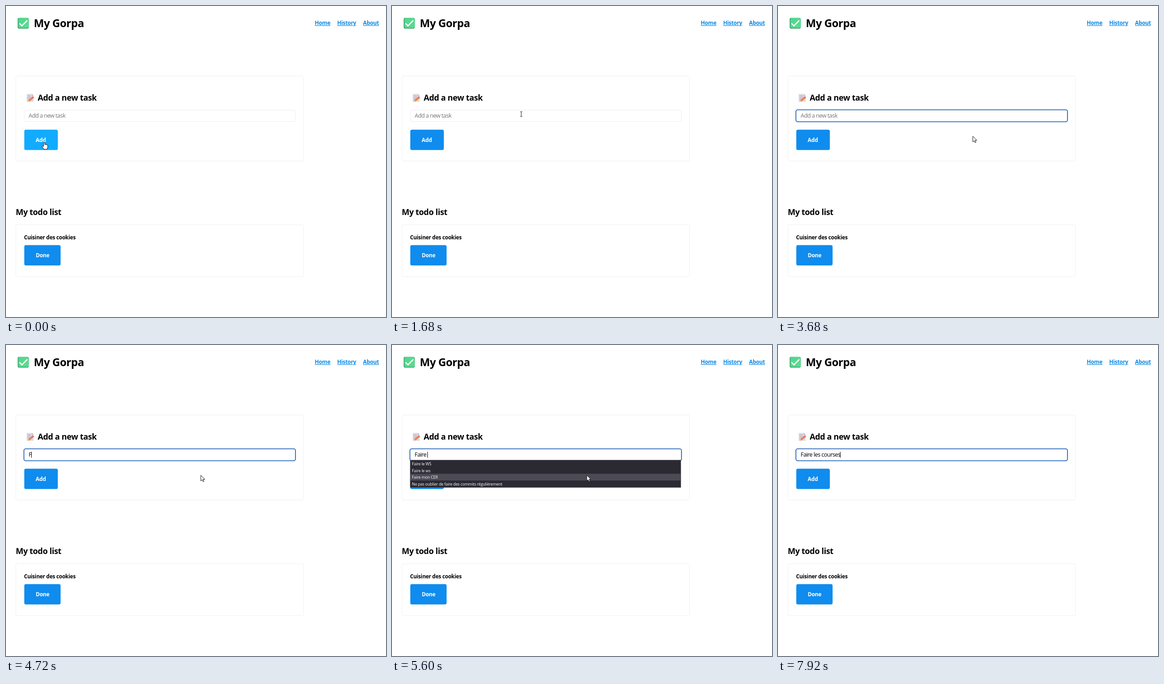
An HTML page that plays this animation: 827x677 px, repeating every 8 s.

```html
<!DOCTYPE html>
<html lang="en">
<head>
<meta charset="utf-8">
<title>Task list</title>
<style>
  html, body { margin: 0; width: 100%; height: 100%; overflow: hidden; background: #fff; }
  svg { display: block; width: 100%; height: 100%; }
  text { font-family: "Open Sans", "Noto Sans", sans-serif; white-space: pre; }
  .bold { font-weight: 700; letter-spacing: -.02em; }
  .title { font-size: 23.5px; }
  .heading { font-size: 17.6px; }
  .nav { font-size: 11.8px; fill: #0c89e4; text-decoration: underline; }
  .label { font-size: 11.8px; fill: #fff; }
  .field { font-size: 12.6px; letter-spacing: -.05em; }
  .option { font-size: 8.7px; letter-spacing: -.02em; fill: #fbfbfe; }
  .card { fill: #fff; stroke: #f0f0f0; }
  .button { fill: #0f8cee; }
  .cursor { fill: #fff; stroke: #111; stroke-width: 1; stroke-linejoin: round; }
</style>
</head>
<body>
<svg viewBox="0 0 827 677">
  <defs>
    <linearGradient id="green" x2="1" y2="1">
      <stop stop-color="#50d68b"/><stop offset="1" stop-color="#5bdc94"/>
    </linearGradient>
  </defs>

  <rect x="25.5" y="25.8" width="24" height="23.5" rx="3" fill="#3a9c68"/>
  <rect x="27" y="26" width="22.3" height="21.8" rx="2.5" fill="url(#green)"/>
  <path d="M29.5 37.8l5.2 5.4L46.3 31.5" fill="none" stroke="#fff" stroke-width="2.5"/>
  <text class="bold title" x="60.5" y="46">My Gorpa</text>
  <text class="bold nav" x="672" y="41">Home</text>
  <text class="bold nav" x="720.7" y="41">History</text>
  <text class="bold nav" x="777" y="41">About</text>

  <rect class="card" x="21.5" y="152.5" width="626" height="185" rx="3.5"/>
  <path d="M45 191.5h11.5l3.5 3.5v13.5H45z" fill="#dcd9e6"/>
  <path d="M56.5 191.5v3.5H60z" fill="#b5b1c4"/>
  <path d="M47 195.5h7M47 198.5h8M47 201.5h6M47 204.5h3" stroke="#aaa7ba"/>
  <path d="M58.5 199.2L50 206.2" stroke="#f3813f" stroke-width="4.2"/>
  <path d="M59.8 198.2l-1.6 1.3" stroke="#e85f78" stroke-width="4.2"/>
  <path d="M48.7 204.6l2.7 3.2-4 .9z" fill="#e9b98a"/>
  <text class="bold heading" x="69" y="206.4">Add a new task</text>

  <rect x="40" y="226.5" width="589.5" height="25" rx="3" fill="#fff" stroke="#ededf0"/>
  <rect id="focus" x="39" y="226" width="591" height="26" rx="4" fill="#fff" stroke="#0f55b0" stroke-width="1.6"/>
  <text id="entry" class="field" x="49.3" y="243.3"></text>
  <path id="caret" d="M0 232.5v13" stroke="#000"/>
  <rect id="add" class="button" x="39.8" y="269.2" width="73" height="44.2" rx="3.5"/>
  <text class="bold label" x="64.6" y="296">Add</text>

  <text class="bold heading" x="21.2" y="455.4">My todo list</text>
  <rect class="card" x="21.5" y="476" width="626" height="113" rx="3.5"/>
  <text class="bold" font-size="11.55" x="39.3" y="508.3">Cuisiner des cookies</text>
  <rect class="button" x="39.8" y="520.6" width="79" height="44.2" rx="3.5"/>
  <text class="bold label" x="64.7" y="547.4">Done</text>

  <g id="menu">
    <rect id="panel" x="39.7" y="250.5" width="589" fill="#2b2a33" stroke="#55545f" stroke-width=".7"/>
    <rect id="hover" x="40" y="280.2" width="588.4" height="14.8" fill="#4b4a55"/>
  </g>

  <g id="pointer" class="cursor">
    <path id="arrow" d="M0 0v12.5l2.9-2.7 2 4.2 2-1-2-4h3.9z"/>
    <path id="hand" d="M-1.2 1Q0-1.2 1.3 1V5.5L3 5l1 1 1.8-.3 1 1.2 1.1.2V11.5L6 16H-.2L-4.5 9.8Q-4.4 8-2.8 8.4L-1.2 10z"/>
    <path id="beam" d="M-2.2-5.5Q0-5.5 0-4.5Q0-5.5 2.2-5.5M0-4.5V4.5M-2.2 5.5Q0 5.5 0 4.5Q0 5.5 2.2 5.5" fill="none"/>
  </g>
</svg>
<script>
  const LOOP = 8000, STEP = 80;
  const FOCUS_AT = 1840, MENU_OPEN = 4880, MENU_SHORT = 5680, MENU_CLOSE = 5920;
  const PHRASE = "Faire les courses";
  const KEY_TIMES = [4640, 4880, 5040, 5200, 5360, 5520, 5680, 5760, 5920, 6000,
                     6240, 6320, 6480, 6560, 6720, 6800, 6880];
  const PATH = [[0, 83, 296], [520, 83, 296], [1040, 119.5, 194.5],
                [FOCUS_AT, 300, 240], [2240, 424, 283.5]];
  const OPTIONS = ["Faire le WS", "Faire le ws", "Faire mon CER",
                   "Ne pas oublier de faire des commits régulièrement"];
  const ROW = 14.8;

  const $ = id => document.getElementById(id);
  const show = (el, on) => el.style.display = on ? "" : "none";
  const inside = (x, y, l, t, r, b) => x >= l && x <= r && y >= t && y <= b;

  const rows = OPTIONS.map((label, i) => {
    const row = document.createElementNS("http://www.w3.org/2000/svg", "text");
    row.setAttribute("class", "option");
    row.setAttribute("x", 43.3);
    row.setAttribute("y", 261.8 + i * ROW);
    row.textContent = label;
    return $("menu").appendChild(row);
  });

  function pointerAt(t) {
    const next = PATH.findIndex(p => p[0] > t);
    if (next < 0) return PATH[PATH.length - 1].slice(1);
    const [t0, x0, y0] = PATH[next - 1], [t1, x1, y1] = PATH[next];
    const u = (t - t0) / (t1 - t0), k = u * u * (3 - 2 * u);
    return [x0 + (x1 - x0) * k, y0 + (y1 - y0) * k];
  }

  function drawPointer(t) {
    const [x, y] = pointerAt(t);
    const overAdd = inside(x, y, 40, 269, 113, 313);
    const overText = inside(x, y, 40, 226, 630, 252) || inside(x, y, 69, 188, 196, 212);
    $("pointer").setAttribute("transform", `translate(${x} ${y})`);
    show($("pointer"), t < MENU_SHORT);
    show($("hand"), overAdd);
    show($("beam"), overText);
    show($("arrow"), !overAdd && !overText);
    $("add").style.fill = overAdd ? "#12abff" : "";
  }

  function drawEntry(t) {
    const typed = KEY_TIMES.filter(k => k <= t).length;
    const entry = $("entry"), focused = t >= FOCUS_AT;
    entry.textContent = typed ? PHRASE.slice(0, typed) : "Add a new task";
    entry.style.fill = typed ? "#000" : "#757575";
    show($("focus"), focused);
    const since = t - (typed ? KEY_TIMES[typed - 1] : FOCUS_AT);
    const width = typed ? entry.getComputedTextLength() : 0;
    $("caret").setAttribute("transform", `translate(${Math.floor(49.6 + width) + .5} 0)`);
    show($("caret"), focused && since % 1000 < 500);
  }

  function drawMenu(t) {
    const count = t < MENU_SHORT ? 4 : 2;
    show($("menu"), t >= MENU_OPEN && t < MENU_CLOSE);
    show($("hover"), count === 4);
    $("panel").setAttribute("height", count * ROW + .4);
    rows.forEach((row, i) => show(row, i < count));
  }

  const start = performance.now();
  function frame() {
    const elapsed = (performance.now() - start) % LOOP;
    const t = Math.floor(elapsed / STEP) * STEP;
    drawPointer(t);
    drawEntry(t);
    drawMenu(t);
    requestAnimationFrame(frame);
  }
  frame();
</script>
</body>
</html>
```
